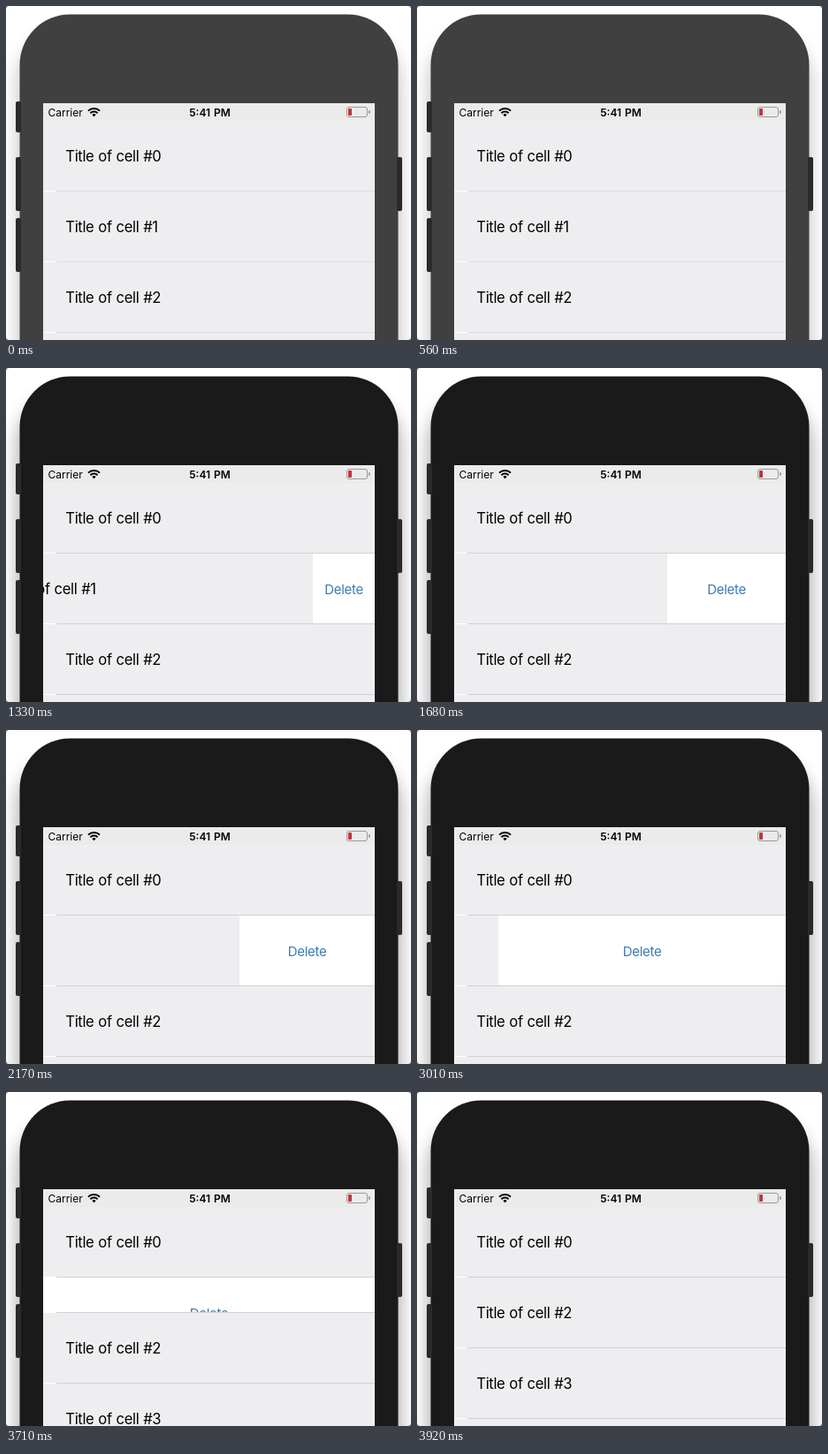
An HTML page that plays this animation: 458x378 px, repeating every 5040 ms.

```html
<!DOCTYPE html>
<html lang="en">
<head>
<meta charset="utf-8">
<title>Swipe to delete</title>
<style>
  html, body { margin: 0; width: 100%; height: 100%; overflow: hidden; background: #fff; }
  svg { display: block; font-family: Inter, "Open Sans", sans-serif; }
  #stage { width: 458px; height: 378px; --body: #404040; --line: #dcdcde; --shadow: .2; }
  #stage.dark { --body: #1a1a1a; --line: #d2d2d4; --shadow: .3; }
  #body { fill: var(--body); }
  #shadow { opacity: var(--shadow); }
  .line { fill: var(--line); }
  #screen, #action { overflow: hidden; }
  .status { font-size: 12px; word-spacing: .8px; }
  .title { font-size: 16.6px; letter-spacing: -.34px; word-spacing: .5px; }
  .delete { font-size: 15px; letter-spacing: -.3px; fill: #3b7bb0; text-anchor: middle; }
</style>
</head>
<body>
<svg id="stage" viewBox="0 0 458 378">
  <defs>
    <filter id="blur" x="-20%" y="-20%" width="140%" height="140%"><feGaussianBlur stdDeviation="10"/></filter>
  </defs>
  <rect width="458" height="378" fill="#777"/>
  <rect width="458" height="378" rx="4" fill="#fff"/>
  <rect id="shadow" x="12" y="28" width="435" height="460" rx="60" filter="url(#blur)"/>
  <rect id="body" x="15.5" y="9.5" width="428" height="440" rx="57"/>
  <g fill="#2a2a2a">
    <rect x="11" y="108" width="6" height="35" rx="2"/>
    <rect x="11" y="171" width="6" height="61" rx="2"/>
    <rect x="11" y="240" width="6" height="61" rx="2"/>
    <rect x="442" y="171" width="6" height="61" rx="2"/>
  </g>

  <svg id="screen" x="42" y="110" width="375" height="268">
    <rect width="375" height="268" fill="#eeeef0"/>
    <g id="upper"></g>
    <g id="swiped"></g>
    <svg id="action" y="100" height="79">
      <rect width="100%" height="100%" fill="#fff"/>
      <text class="delete" x="50%" y="46">Delete</text>
    </svg>
    <g id="lower"><rect y="180" width="375" height="180" fill="#eeeef0"/></g>
    <rect width="375" height="20" fill="#ebebe9"/>
    <g class="status">
      <text x="5.5" y="14.5">Carrier</text>
      <text x="188.5" y="14.5" text-anchor="middle" font-weight="600">5:41 PM</text>
    </g>
    <g fill="none" stroke="#000" stroke-width="2">
      <path d="M51 8.6a9.2 9.2 0 0 1 13 0M53.4 11.2a5.8 5.8 0 0 1 8.2 0"/>
      <path d="M57.5 15.2l-2.2-2.2a3.1 3.1 0 0 1 4.4 0z" fill="#000" stroke="none"/>
    </g>
    <rect x="343.5" y="4.5" width="23" height="11" rx="2.5" fill="none" stroke="#9a9a9a"/>
    <rect x="345" y="6" width="4" height="8" rx="1" fill="#c0353d"/>
    <path d="M368 8a2 2 0 0 1 0 4z" fill="#9a9a9a"/>
  </svg>
</svg>
<script>
const LOOP = 5040, STEP = 70, ROW = 80;
const $ = id => document.getElementById(id);
const set = (id, attrs) => {
  for (const name in attrs) $(id).setAttribute(name, attrs[name]);
};
const add = (id, markup) => $(id).insertAdjacentHTML('beforeend', markup);

const title = i => `<text class="title" x="25.3" y="${66 + ROW * i}">Title of cell #${i}</text>`;
const line = i => `<rect y="${99 + ROW * i}" width="15" height="1" fill="#fff"/>
  <rect class="line" x="15" y="${99 + ROW * i}" width="360" height="1"/>`;

add('upper', title(0) + line(0));
add('swiped', title(1));
add('lower', line(1) + title(2) + line(2) + title(3) + line(3));

// [time, distance swiped to the left]
const swipe = [[1050, 0], [1330, 70], [1610, 126], [1680, 134], [1890, 148], [2170, 153],
  [2450, 153], [2590, 182], [2870, 302], [3010, 325], [3220, 325], [3360, 362], [3500, 375]];

function track(keys, t) {
  const next = keys.findIndex(key => key[0] > t);
  if (next === 0) return keys[0][1];
  if (next < 0) return keys[keys.length - 1][1];
  const [t0, v0] = keys[next - 1], [t1, v1] = keys[next];
  return v0 + (v1 - v0) * (t - t0) / (t1 - t0);
}

function smooth(t, start, end) {
  const p = Math.min(1, Math.max(0, (t - start) / (end - start)));
  return p * p * (3 - 2 * p);
}

function draw(now) {
  const t = Math.floor(now % LOOP / STEP) * STEP;
  const offset = track(swipe, t);
  const collapse = smooth(t, 3500, 3920);

  $('stage').classList.toggle('dark', t >= 980);
  set('swiped', { transform: `translate(${-offset})` });
  set('action', { x: 375 - offset, width: offset, visibility: collapse < 1 ? 'visible' : 'hidden' });
  set('lower', { transform: `translate(0 ${-ROW * collapse})` });
}

const start = performance.now();
function frame() {
  draw(performance.now() - start);
  requestAnimationFrame(frame);
}
frame();
</script>
</body>
</html>
```
